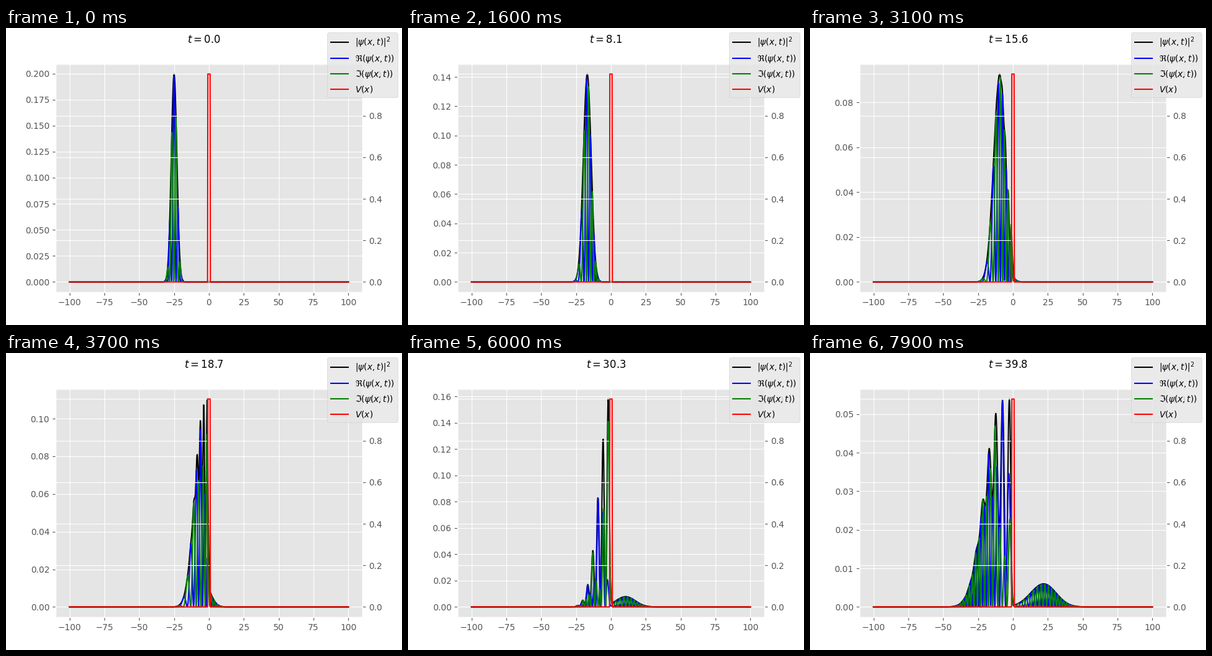
These frames come from a looping animation (640 px wide and 480 px high, 8000 ms). A matplotlib script:

```python
import numpy as np
import matplotlib.pyplot as plt
from matplotlib.animation import FuncAnimation

plt.style.use("ggplot")

FRAMES, INTERVAL = 80, 100
times = np.linspace(0, 60, 120)[:FRAMES]

# Gaussian packet of unit wave number running into a square barrier
x = np.linspace(-100, 100, 1001)
dx = x[1] - x[0]
x0, sigma, k0 = -25, 2, 1
V = np.where(np.abs(x) < 0.9, 1.0, 0.0)
psi0 = (2 * np.pi * sigma**2) ** -0.25 * np.exp(
    -((x - x0) ** 2) / (4 * sigma**2) + 1j * k0 * x)

# Finite-difference Hamiltonian, solved exactly through its eigenstates
hop = np.full(x.size - 1, -0.5 / dx**2)
H = np.diag(1 / dx**2 + V) + np.diag(hop, 1) + np.diag(hop, -1)
energy, states = np.linalg.eigh(H)
coeffs = states.T @ psi0


def psi_at(t):
    return states @ (coeffs * np.exp(-1j * energy * t))


fig, ax = plt.subplots(figsize=(6.4, 4.8), dpi=100)
title = fig.suptitle("$t=0.0$")
prob, = ax.plot(x, 0 * x, color="black", label=r"$|\psi(x,t)|^2$")
real, = ax.plot(x, 0 * x, color="blue", label=r"$\Re(\psi(x,t))$")
imag, = ax.plot(x, 0 * x, color="green", label=r"$\Im(\psi(x,t))$")
ax_v = ax.twinx()
ax_v.plot(x, V, color="red", label="$V(x)$")
fig.legend()


def update(i):
    psi = psi_at(times[i])
    density = np.abs(psi) ** 2
    prob.set_ydata(density)
    real.set_ydata(psi.real**2)
    imag.set_ydata(psi.imag**2)
    top = density.max()
    ax.set_ylim(-0.05 * top, 1.05 * top)
    title.set_text(f"$t={times[i]:.1f}$")
    return prob, real, imag, title


anim = FuncAnimation(fig, update, frames=FRAMES, interval=INTERVAL,
                     repeat=True, repeat_delay=0, blit=False)
plt.show()
```
